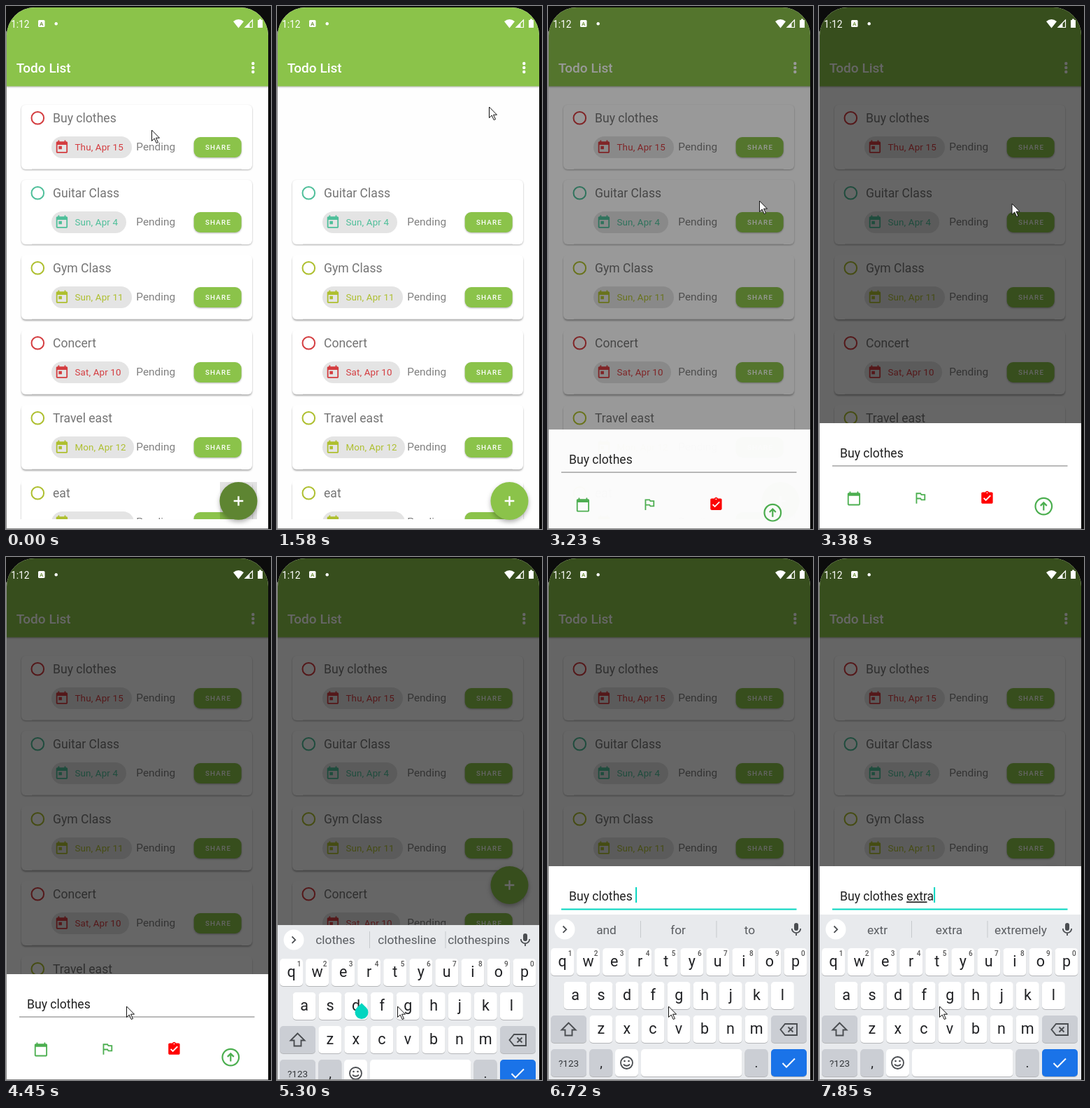
Animation, 379 px wide and 746 px high, one loop 8000 ms. Source, as an HTML page:

```html
<!DOCTYPE html>
<html lang="en">
<head>
<meta charset="utf-8">
<title>Todo List</title>
<style>
  html, body { margin: 0; width: 100%; height: 100%; overflow: hidden; background: #0c0c0c; }
  svg { display: block; width: 379px; height: 746px; font-family: Roboto, sans-serif; }
  text { white-space: pre; }
  .button { filter: drop-shadow(0 1px 1px rgba(0,0,0,.3)); }
  .fab { filter: drop-shadow(0 3px 3px rgba(0,0,0,.3)); }
  .key { filter: drop-shadow(0 1px 0 rgba(0,0,0,.22)); }
</style>
</head>
<body>
<svg id="stage" viewBox="0 0 379 746"></svg>
<script>
const LOOP = 8000, FRAME = 135;
const GREEN = '#8bc34a', RED = '#d43d40', MINT = '#4fbf9a', OLIVE = '#aebf2f', TEAL = '#03d5c0';
const ACTION = '#4caf50', DARK = '#cbced4', INK = '#4a4d51', LETTER = '#202124';

const rect = (x, y, w, h, fill, r = 0, more = '') =>
  `<rect x="${x}" y="${y}" width="${w}" height="${h}" rx="${r}" fill="${fill}" ${more}/>`;
const circle = (x, y, r, fill, more = '') => `<circle cx="${x}" cy="${y}" r="${r}" fill="${fill}" ${more}/>`;
const text = (x, y, size, fill, str, more = '') =>
  `<text x="${x}" y="${y}" font-size="${size}" fill="${fill}" ${more}>${str}</text>`;
const line = (d, stroke, width = 2) => `<path d="${d}" fill="none" stroke="${stroke}" stroke-width="${width}"/>`;
const icon = (x, y, fill, d) => `<path transform="translate(${x} ${y}) scale(.91)" fill="${fill}" fill-rule="evenodd" d="${d}"/>`;
const middle = 'text-anchor="middle"', medium = 'font-weight="500"';

const TODAY = 'M19 3h-1V1h-2v2H8V1H6v2H5c-1.1 0-2 .9-2 2v14c0 1.1.9 2 2 2h14c1.1 0 2-.9 2-2V5c0-1.1-.9-2-2-2zm0 16H5V8h14zM7 10h5v5H7z';
const CALENDAR = 'M20 3h-1V1h-2v2H7V1H5v2H4c-1.1 0-2 .9-2 2v16c0 1.1.9 2 2 2h16c1.1 0 2-.9 2-2V5c0-1.1-.9-2-2-2zm0 18H4V8h16z';
const FLAG = 'M14 6l-1-2H5v17h2v-7h5l1 2h7V6zm4 8h-4l-1-2H7V6h5l1 2h5z';
const DONE = 'M19 3h-4.2a3 3 0 0 0-5.6 0H5c-1.1 0-2 .9-2 2v14c0 1.1.9 2 2 2h14c1.1 0 2-.9 2-2V5c0-1.1-.9-2-2-2zm-7 0a1 1 0 0 1 0 2 1 1 0 0 1 0-2zm-2 14l-4-4 1.4-1.4 2.6 2.6 6.6-6.6L18 9z';

const tasks = [
  ['Buy clothes', 'Thu, Apr 15', 115, RED],
  ['Guitar Class', 'Sun, Apr 4', 107, MINT],
  ['Gym Class', 'Sun, Apr 11', 115, OLIVE],
  ['Concert', 'Sat, Apr 10', 111, RED],
  ['Travel east', 'Mon, Apr 12', 118, OLIVE],
  ['eat', 'Mon, Apr 05', 118, OLIVE],
];

// Shadows fall further the lower a card lies.
const card = ([title, date, width, color], i) => `<g transform="translate(0 ${i * 107})"><g id="card${i}">
  ${rect(22, 141, 330, 92, '#fff', 6, `style="filter:drop-shadow(0 ${1.2 + i * .4}px 1.3px rgba(0,0,0,.3))"`)}
  ${rect(37, 232, 300, 1, '#000', 0, 'opacity=".1"')}
  ${circle(45.3, 159.7, 8.8, 'none', `stroke="${color}" stroke-width="2"`)}
  ${text(67, 166, 17.6, '#757575', title)}
  ${rect(65, 186, width, 31, '#e4e4e4', 15.5)}
  ${icon(69, 190.6, color, TODAY)}
  ${text(98.5, 206, 13.4, color, date, 'letter-spacing=".13"')}
  ${text(186.3, 206, 15.4, '#808080', 'Pending')}
  ${rect(268.7, 187, 68, 29, GREEN, 9, 'class="button"')}
  ${text(285, 205.3, 9.8, '#fff', 'SHARE', medium + ' letter-spacing="1.2"')}
</g></g>`;

const header = rect(0, 0, 379, 114.5, GREEN, 0, 'class="button"') +
  text(14.7, 95.2, 19, '#fff', 'Todo List', medium) +
  [82, 88, 94].map(y => circle(353.3, y, 2.2, '#fff')).join('');

const statusBar = text(7, 30.5, 13.8, '#fff', '1:12') +
  rect(46, 20, 9.5, 10, '#fff', 1.5) + text(50.7, 28.3, 8, '#7a9a4a', 'A', middle + ' font-weight="700"') +
  circle(71.7, 25.3, 2.2, '#fff') +
  '<path fill="#fff" d="M325 22q7.5-6 15 0l-7.5 9.5zM342 31l6.5-6.5v6.5zM360 20h2v-1.5h3V20h2v11h-7z"/>' +
  line('M342 30.5L352.5 20V30.5z', '#fff', 1.2);

const fab = circle(332.5, 706, 27, GREEN, 'class="fab"') +
  `<g id="press">${circle(332.5, 706, 27, '#000', 'opacity=".24"')}${rect(306, 679, 53, 53, '#000', 0, 'opacity=".11"')}</g>` +
  line('M325.7 706h13.6M332.5 699.2v13.6', '#fff', 2.4);

const sheet = rect(0, 0, 379, 746, '#fff') +
  text(30, 49.4, 17.6, '#212121', '<tspan id="plain"></tspan><tspan id="marked" text-decoration="underline"></tspan><tspan id="rest"></tspan>', 'id="entry"') +
  rect(0, 30, 2, 22, TEAL, 0, 'id="caret"') +
  rect(19, 60.5, 336.5, 1, '#777', 0, 'id="rule"') +
  icon(39, 96.5, ACTION, CALENDAR) + icon(134, 95.7, ACTION, FLAG) + icon(229.5, 95.7, '#f00', DONE) +
  circle(321.3, 118.6, 11.8, 'none', `stroke="${ACTION}" stroke-width="2.2"`) +
  line('M321.3 124.6v-11M316.8 117.9l4.5-4.5 4.5 4.5', ACTION, 2.2);

const key = (x, y, w, fill = '#fff') => rect(x, y, w, 39, fill, 5, 'class="key"');
const letters = (row, x, y) => [...row].map((c, i) => {
  const left = x + i * 37.05;
  const digit = y === 558 ? text(left + 27.5, y + 11, 10, '#555', (i + 1) % 10, middle + ' ' + medium) : '';
  return key(left, y, 33) + text(left + 16.5, y + 26, 21.5, LETTER, c, middle) + digit;
}).join('');

const keyboard = rect(0, 510, 379, 236, '#e8eaed') +
  circle(24, 531, 14.5, '#fff') + line('M21.5 526.5l4.7 4.7-4.7 4.7', INK, 1.8) +
  rect(132, 519, 1, 24, '#c6c9cd') + rect(240.5, 519, 1, 24, '#c6c9cd') +
  [0, 1, 2].map(i => text(83.5 + i * 102.5, 537.5, 17.3, '#5a5d61', '', `${middle} id="word${i}"`)).join('') +
  rect(352, 522, 6, 11, INK, 3) + line('M348.8 530a6.2 6.2 0 0 0 12.4 0M355 536v4', INK, 1.8) +
  letters('qwertyuiop', 4, 558) + letters('asdfghjkl', 22.5, 606) + letters('zxcvbnm', 59.3, 654) +
  key(4, 654, 51, DARK) + line('M29.5 664.5l-10 10h5v8h10v-8h5z', INK, 1.9) +
  key(319, 654, 51, DARK) + line('M339 666h17v16h-17l-6.5-8zM343.5 670.5l7 7m0-7l-7 7', INK, 1.9) +
  key(4, 702, 51, DARK) + text(29.5, 727, 13.5, '#33363a', '?123', middle) +
  key(59.3, 702, 33, DARK) + text(76, 728, 19, LETTER, ',', middle) +
  key(96, 702, 33) + circle(112.5, 721.5, 8.5, 'none', `stroke="${INK}" stroke-width="1.8"`) +
  circle(109.5, 719, 1.3, INK) + circle(115.5, 719, 1.3, INK) + line('M108 723.5a5 4 0 0 0 9 0', INK, 1.8) +
  key(133, 702, 144.5) + key(281.5, 702, 33, DARK) + text(298, 728, 19, LETTER, '.', middle) +
  key(319, 702, 51, '#1a73e8') + line('M335.5 722l5.5 5.5 12-12', '#fff');

document.getElementById('stage').innerHTML = `
  <clipPath id="screen"><path d="M1 745V42A40 40 0 0 1 41 2H335A40 40 0 0 1 375 42V745z"/></clipPath>
  <clipPath id="list">${rect(0, 114, 379, 618, '#000')}</clipPath>
  ${rect(0, 0, 379, 746, '#0c0c0c')}${rect(0, 36, 1, 710, '#8a8a8a')}${rect(0, 745, 375, 1, '#8a8a8a')}
  <g clip-path="url(#screen)">
    ${rect(0, 0, 379, 746, '#fefefe')}
    <g clip-path="url(#list)">${tasks.map(card).join('')}</g>
    ${header}
    <g id="fab">${fab}</g>
    ${rect(0, 0, 379, 746, '#000', 0, 'id="dim"')}
    ${statusBar}
    <g id="sheet">${sheet}</g>
    <g id="keyboard">${keyboard}</g>
    <path id="handle" fill="${TEAL}" d="M0 0L6.7 6.5A9.5 9.5 0 1 1-6.7 6.5z"/>
  </g>
  <path id="pointer" d="M-.5 0V15.500l3.700-3.500 3 6.500 2.300-1-3-6.300h5z" fill="#fff" stroke="#111"/>`;

const el = id => document.getElementById(id);
const set = (id, attrs) => { for (const k in attrs) el(id).setAttribute(k, attrs[k]); };
const move = (id, x, y) => set(id, { transform: `translate(${x} ${y})` });

const clamp = u => Math.max(0, Math.min(1, u));
const ramp = (u, from, to) => clamp((u - from) / (to - from));

// Progress in hard steps about one FRAME apart; the first lands on start, the last on end.
const stepCount = (start, end) => Math.round((end - start) / FRAME) + 1;
function progress(t, start, end) {
  const n = stepCount(start, end), gap = (end - start) / (n - 1) || 1;
  return clamp((Math.floor((t - start) / gap + 1e-6) + 1) / n);
}

// start, end, destination
const moves = [
  [120, 380, 3, 209], [750, 870, 37, 209], [1150, 1580, 304, 144], [1870, 2810, 232, 160],
  [3230, 3230, 303, 278], [3365, 3500, 250, 286], [3780, 4060, 143, 658], [4330, 4450, 173, 641],
];
function pointerAt(t) {
  let x = 209, y = 177;
  for (const [start, end, toX, toY] of moves) {
    const u = progress(t, start, end);
    x += (toX - x) * u;
    y += (toY - y) * u;
  }
  return [x, y];
}

const FOCUS = 4850, SETTLED = 6040, TYPING = 7280, TYPED = 7850, WORD = 'extra';
function entryAt(t) {
  if (t < FOCUS) return ['Buy clothes', '', '', []];
  const before = ['clothes', 'clothesline', 'clothespins'];
  if (t < 6320) return ['Buy ', 'clothes', '', before];
  const step = Math.round(progress(t, TYPING, TYPED) * stepCount(TYPING, TYPED));
  const length = t < 7000 ? 0 : Math.max(1, step), marked = Math.max(0, step - 1);
  const words = step ? [WORD.slice(0, marked || 1), WORD, 'extremely'] : ['and', 'for', 'to'];
  return ['Buy clothes ', WORD.slice(0, marked), WORD.slice(marked, length), words];
}

function draw(t) {
  const swipe = progress(t, 1150, 1580), back = t >= 1870;
  move('card0', back ? 0 : 700 * swipe ** 3, 0);
  set('card0', { opacity: back ? clamp(3 * progress(t, 1870, 2810)) : 1 });
  set('press', { opacity: 1 - swipe });

  const open = progress(t, 2960, 3440), typing = progress(t, FOCUS, 5670);
  const rise = 136 * ramp(typing, .7, 1) + (t >= SETTLED ? 18 : 0);
  set('dim', { opacity: .6 * ramp(open, .373, .714) });
  set('sheet', { opacity: ramp(open, .341, .608) });
  move('sheet', 0, 746 - 151 * ramp(open, .304, .619) - rise);
  move('keyboard', 0, 236 * (1 - ramp(typing, .15, .6)));
  move('fab', 0, typing > .55 ? -238 : 0);

  const focused = t >= FOCUS;
  move('handle', 121, focused && t < SETTLED ? 646 - 17 * typing : -50);
  set('rule', { fill: focused ? TEAL : '#777', height: focused ? 2 : 1 });

  const [plain, marked, rest, words] = entryAt(t);
  el('plain').textContent = plain;
  el('marked').textContent = marked;
  el('rest').textContent = rest;
  words.forEach((word, i) => { el('word' + i).textContent = word; });
  const caret = focused && (t < SETTLED || t >= 6720);
  set('caret', { x: 30 + el('entry').getComputedTextLength(), opacity: caret ? 1 : 0 });

  move('pointer', ...pointerAt(t));
}

const start = performance.now();
function tick() {
  draw((performance.now() - start) % LOOP);
  requestAnimationFrame(tick);
}
tick();
</script>
</body>
</html>
```
